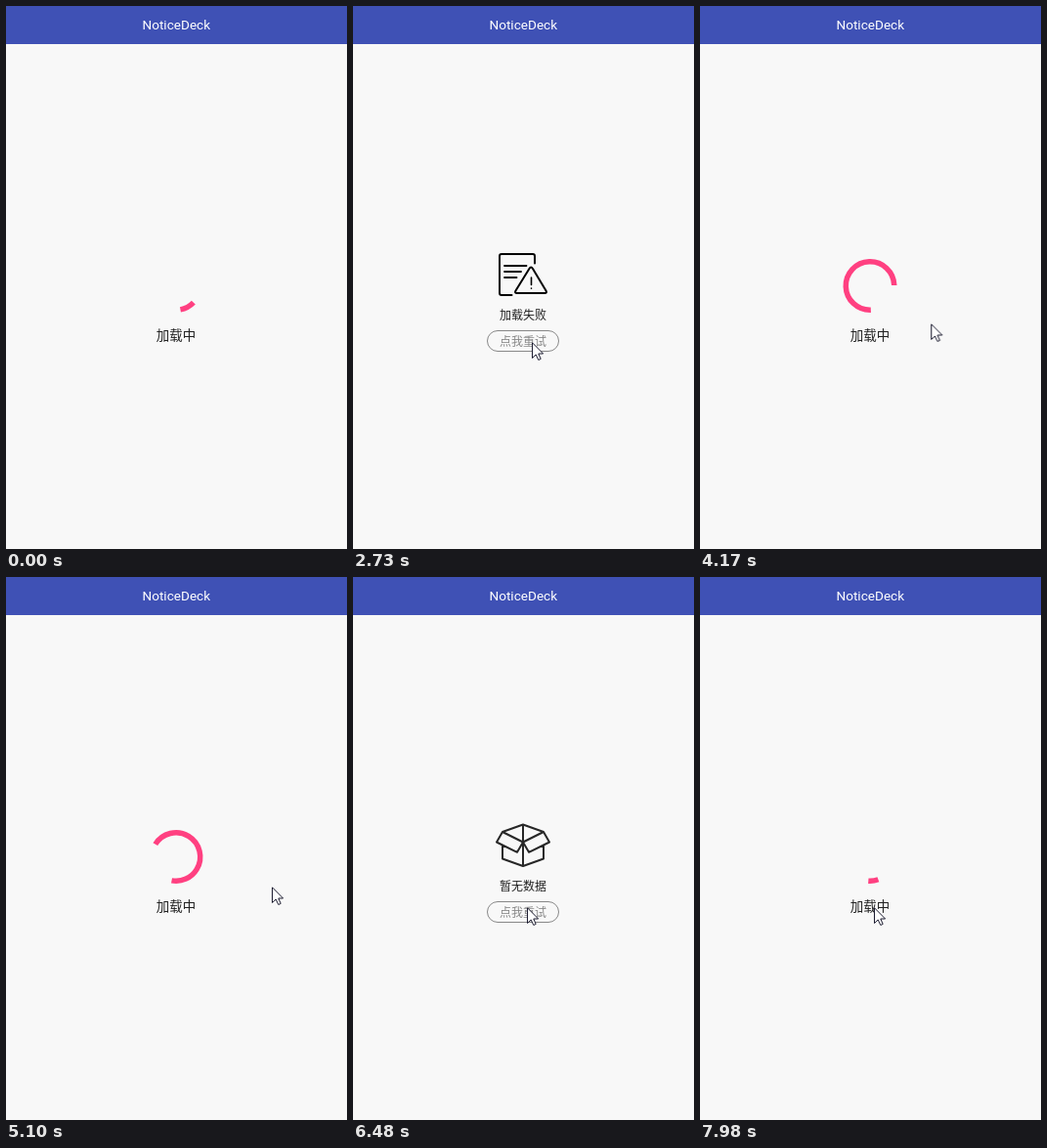
Recreate the animation shown at these times as an HTML page. Size 349x556 px, loop 8000 ms.

```html
<!DOCTYPE html>
<html lang="zh-CN">
<head>
<meta charset="utf-8">
<title>Loading states</title>
<style>
  html, body { margin: 0; width: 100%; height: 100%; overflow: hidden; background: #f8f8f8; }
  svg { display: block; width: 349px; height: 556px; }
  text { font-family: "Noto Sans CJK SC", "Noto Sans CJK JP", "Noto Sans", sans-serif; font-size: 12px; text-anchor: middle; fill: #222; }
  .title { font: 400 13.6px Roboto, sans-serif; fill: #fff; }
  .wait { font-size: 13.5px; }
  .retry { fill: #888; }
  .line { fill: none; stroke-width: 2; stroke-linejoin: round; }

  #loading, #failed, #empty, #cursor { animation: 8s infinite; }
  #loading { animation-name: loading; }
  #failed { animation-name: failed; }
  #empty { animation-name: empty; }
  #cursor { animation-name: cursor; animation-timing-function: linear; }

  @keyframes loading {
    0%, 10.5% { opacity: 1; animation-timing-function: ease-in-out; }
    13.7%, 41.75% { opacity: 0; animation-timing-function: ease-in-out; }
    44.9%, 72% { opacity: 1; animation-timing-function: ease-in-out; }
    74.25%, 84.5% { opacity: 0; animation-timing-function: ease-in-out; }
    87.6%, 100% { opacity: 1; }
  }
  @keyframes failed {
    0%, 10.5% { opacity: 0; animation-timing-function: ease-in-out; }
    13.7%, 41.75% { opacity: 1; animation-timing-function: ease-in-out; }
    44.9%, 100% { opacity: 0; }
  }
  @keyframes empty {
    0%, 72% { opacity: 0; animation-timing-function: ease-in-out; }
    74.25%, 84.5% { opacity: 1; animation-timing-function: ease-in-out; }
    87.6%, 100% { opacity: 0; }
  }
  @keyframes cursor {
    0%, 28.1% { transform: translate(360px, 140px); animation-timing-function: step-end; }
    28.12% { transform: translate(340px, 157px); animation-timing-function: ease-out; }
    31.12%, 33.4% { transform: translate(190px, 336px); }
    34.1%, 46.25% { transform: translate(183px, 344px); }
    52.12% { transform: translate(236px, 325px); animation-timing-function: ease-out; }
    56.25%, 66.25% { transform: translate(272px, 317px); }
    67.75%, 76.5% { transform: translate(268px, 317px); animation-timing-function: ease-in-out; }
    81%, 100% { transform: translate(178px, 338px); }
  }
</style>
</head>
<body>
<svg viewBox="0 0 349 556">
  <defs>
    <g id="button">
      <rect x="137.5" y="332.5" width="73" height="21" rx="10.5" fill="none" stroke="#888"/>
      <text class="retry" x="174" y="348">点我重试</text>
    </g>
  </defs>

  <rect width="349" height="556" fill="#f8f8f8"/>
  <rect width="349" height="39" fill="#3f51b5"/>
  <text class="title" x="174.3" y="24">NoticeDeck</text>

  <g id="loading">
    <circle id="ring" cx="174" cy="286.5" r="24.75" pathLength="360" fill="none" stroke="#ff4081" stroke-width="5.5"/>
    <text class="wait" x="174" y="342.4">加载中</text>
  </g>

  <g id="failed">
    <g class="line" stroke="#000" stroke-linecap="round">
      <path d="M186 263.5V256Q186 254 184 254H152Q150 254 150 256V294Q150 296 152 296H162.5"/>
      <path d="M155 266H177.5M155 272H172M155 278H167.5" stroke-width="1.8"/>
      <path d="M180.4 269Q182.200 266 184 269L197.500 291.500Q199 294 196 294H168Q165 294 166.500 291.500Z"/>
      <path d="M182.500 278V285.500M182.500 289V289.300" stroke-width="1.600"/>
    </g>
    <text x="174" y="321">加载失败</text>
    <use href="#button"/>
  </g>

  <g id="empty">
    <path class="line" stroke="#272727" d="M174 253.500L153 261L147 271.500L168 281.800L174 271.500L180 281.800L201 271.500L195 261ZM153 261L174 271.500L195 261M174 253.500V296M153 275V288.500L174 296L195 288.500V275"/>
    <text x="174" y="321">暂无数据</text>
    <use href="#button"/>
  </g>

  <g id="cursor">
    <path d="M.5 .8V16.500L4.200 13L6.800 18.500L9.200 17.400L6.800 12H11.600Z" fill="#fff" stroke="#1c1c30" stroke-linejoin="round"/>
  </g>
</svg>
<script>
  const LOOP = 8000, CYCLE = 1333, SPEED = 1.055, CAP = 6.4;
  const ring = document.getElementById('ring');

  // Spinner start times; the last one is already running when the loop begins
  const starts = [6876, 3459, -1045];

  const bezier = (s, a, b, c, d) =>
    a * (1 - s) ** 3 + 3 * b * s * (1 - s) ** 2 + 3 * c * s * s * (1 - s) + d * s ** 3;

  // Progress along a curve running from x0 to x3, flat outside it
  function ease(u, x0, x1, x2, x3) {
    if (u <= x0) return 0;
    if (u >= x3) return 1;
    let lo = 0, hi = 1;
    for (let i = 0; i < 24; i++) {
      const mid = (lo + hi) / 2;
      if (bezier(mid, x0, x1, x2, x3) < u) lo = mid; else hi = mid;
    }
    return bezier(lo, 0, 0, 1, 1);
  }

  function drawRing(t) {
    const start = starts.find(s => t >= s - 120);
    const run = Math.max(0, (t - start) * SPEED);
    const u = run % CYCLE / CYCLE;
    const tail = 270 * ease(u, .5, .7, .6, 1);
    const head = 270 * ease(u, 0, .2, .1, .5);
    const turn = 90 * u + 720 * run / 4444;
    const sweep = run ? head - tail + 2 * CAP : 0;
    ring.setAttribute('stroke-dasharray', `${sweep} ${360 - sweep}`);
    ring.setAttribute('transform', `rotate(${turn + tail - CAP - 90} 174 286.5)`);
    ring.setAttribute('visibility', sweep ? 'visible' : 'hidden');
  }

  const origin = performance.now();
  function frame() {
    drawRing((performance.now() - origin) % LOOP);
    requestAnimationFrame(frame);
  }
  frame();
</script>
</body>
</html>
```
